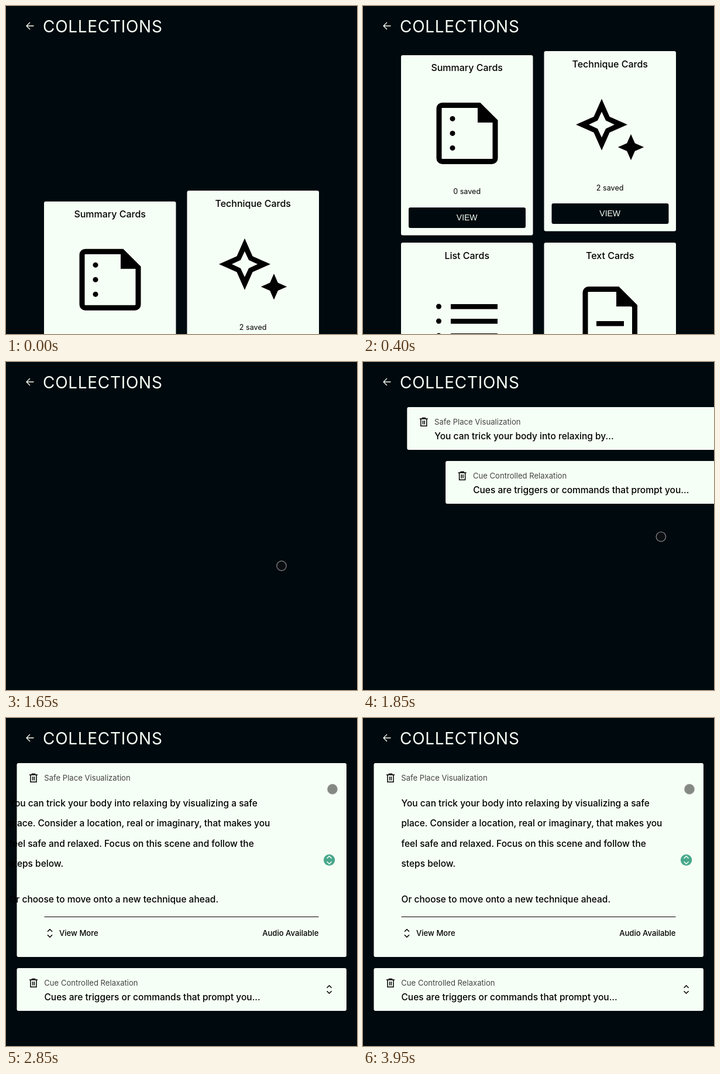
An HTML page that plays this animation: 600x560 px, repeating every 4000 ms.

```html
<!DOCTYPE html>
<html lang="en">
<head>
<meta charset="utf-8">
<title>Collections</title>
<style>
  html, body { margin: 0; width: 100%; height: 100%; overflow: hidden; background: #00090e; }
  svg { display: block; width: 600px; height: 560px; font-family: Inter, sans-serif; }
  .heading { font-size: 28px; letter-spacing: .7px; fill: #f6fff5; }
  .card { fill: #f6fff5; }
  .name { font-size: 16px; font-weight: 500; text-anchor: middle; }
  .saved { font-size: 12.6px; text-anchor: middle; }
  .view { font: 14px "Liberation Sans", Arial, sans-serif; fill: #f6fff5; text-anchor: middle; }
  .label { font-size: 13.1px; fill: #444; }
  .body { font-size: 15.5px; font-weight: 500; }
  .action { font-size: 13.1px; font-weight: 500; }
  .line { fill: none; stroke: #000; stroke-width: 1.6; }
  .heavy { fill: none; stroke: #000; stroke-width: 9; }
</style>
</head>
<body>
<svg id="stage" viewBox="0 0 600 560">
  <path class="line" style="stroke:#f6fff5;stroke-width:1.3" d="M47.5 34H35M41 28L35 34L41 40"/>
  <text class="heading" x="63" y="44.5">COLLECTIONS</text>
  <g id="grid"></g>
  <g id="list"></g>
  <circle id="cursor" r="8.2" fill="#141414" fill-opacity=".5" stroke="#8c8c8c" stroke-opacity=".85" stroke-width="1.4"/>
</svg>
<script>
const LOOP = 4000, CARDS_LEAVE = 1350, LIST_ENTER = 1700, HOVER = 2550, EXPAND = 2850;
const $ = id => document.getElementById(id);
const clamp = v => Math.min(1, Math.max(0, v));
const easeOut = v => 1 - (1 - clamp(v)) ** 3;
const decay = (amount, elapsed, tau) => amount * Math.exp(-Math.max(0, elapsed) / tau);
const move = (el, x, y) => el.setAttribute('transform', `translate(${x} ${y})`);
const show = (el, visible) => el.setAttribute('visibility', visible ? 'inherit' : 'hidden');

function star(cx, cy, outer, inner, fill = '#000') {
  const points = Array.from({ length: 8 }, (_, i) => {
    const r = i % 2 ? inner * Math.SQRT2 : outer, a = i * Math.PI / 4;
    return `${cx + r * Math.cos(a)},${cy + r * Math.sin(a)}`;
  });
  return `<polygon points="${points.join(' ')}" fill="${fill}"/>`;
}
const dots = (x, y) => [0, 25, 50].map(d => `<circle cx="${x}" cy="${y + d}" r="4.5"/>`).join('');
const bar = (x, y, w) => `<rect x="${x}" y="${y}" width="${w}" height="8.5"/>`;

// Page with a folded top right corner.
function page(left, top, right, bottom, fold) {
  const r = 5.5, x = right - fold;
  return `<path class="heavy" d="M${left + r} ${top}H${x}L${right} ${top + fold}V${bottom - r}
    a${r} ${r} 0 0 1 ${-r} ${r}H${left + r}a${r} ${r} 0 0 1 ${-r} ${-r}V${top + r}a${r} ${r} 0 0 1 ${r} ${-r}Z"/>
    <path d="M${x - 2.5} ${top}v29.5H${right + 2}v-4L${x + 2} ${top - 2}Z"/>`;
}

const cards = [
  { name: 'Summary Cards', count: 0, x: 65, y: 77, rise: 258, time: 572,
    icon: page(65, 85.5, 161, 181.5, 27.5) + dots(88, 108.5) },
  { name: 'Technique Cards', count: 2, x: 309.5, y: 77, rise: 240, time: 400,
    icon: star(98.5, 125.5, 44, 13.5) + star(98.5, 125.5, 22, 7, '#f6fff5') + star(148.5, 164, 22.2, 6.8) },
  { name: 'List Cards', count: 0, x: 65, y: 404, rise: 220, time: 400,
    icon: dots(64.5, 109) + [105, 130, 155].map(y => bar(85, y, 80)).join('') },
  { name: 'Text Cards', count: 0, x: 309.5, y: 404, rise: 200, time: 400,
    icon: page(70.5, 79.5, 155, 195, 29) + bar(89.5, 134, 47) }
];
$('grid').innerHTML = cards.map(c => `<g>
  <rect class="card" width="225.5" height="307.5" rx="3"/>
  <text class="name" x="112.7" y="27.5">${c.name}</text>${c.icon}
  <text class="saved" x="112.7" y="237.5">${c.count} saved</text>
  <rect x="13" y="260" width="200" height="35" rx="3" fill="#00090e"/>
  <text class="view" x="112.7" y="282">VIEW</text></g>`).join('');

const chevrons = 'M-4-2.7L0-6.7L4-2.7M-4 2.7L0 6.7L4 2.7';
const row = (label, text) => `<g>
  <rect class="card" x="18.5" width="563.5" height="73" rx="3"/>
  <path class="line" style="stroke-width:1.5" d="M40 20H54M44.5 19.5V18.5H49.5V19.5M42 20V32.2H52V20M45.6 23V29.5M48.4 23V29.5"/>
  <text class="label" x="65.3" y="30">${label}</text>
  <text class="body summary" x="65.5" y="54.5">${text}</text>
  <g class="toggle"><circle r="9.7" fill="none"/><path class="line" d="${chevrons}"/></g></g>`;

$('list').innerHTML =
  row('Safe Place Visualization', 'You can trick your body into relaxing by...') +
  row('Cue Controlled Relaxation', 'Cues are triggers or commands that prompt you...') +
  `<g id="details"><g id="story">${[
    ['You can trick your body into relaxing by visualizing a safe', 150.5],
    ['place. Consider a location, real or imaginary, that makes you', 185],
    ['feel safe and relaxed. Focus on this scene and follow the', 219.5],
    ['steps below.', 254],
    ['Or choose to move onto a new technique ahead.', 314.5]
  ].map(([text, y]) => `<text class="body" x="65.5" y="${y}">${text}</text>`).join('')}</g>
  <path class="line" style="stroke-width:1" d="M65.5 339.5H534.5"/>
  <path class="line" transform="translate(75 367.5)" d="${chevrons}"/>
  <text class="action" x="91" y="372">View More</text>
  <text class="action" x="534.5" y="372" text-anchor="end">Audio Available</text></g>`;

const cardEls = [...$('grid').children];
const [firstRow, secondRow] = $('list').children;
const toggles = [...document.querySelectorAll('.toggle')];
const [toggleDisc, toggleIcon] = toggles[0].children;
move(toggles[1], 552.6, 36.5);

// Pointer stops: time, x, y.
const path = [[750, 528, 570], [1200, 471, 346], [1300, 471, 346], [1500, 471, 348], [1750, 471, 348],
              [2000, 566, 225], [2250, 586, 148], [2350, 585.5, 144.5], [2600, 558, 121.5], [LOOP, 558, 121.5]];
function pointerAt(t) {
  const i = path.findIndex(stop => t < stop[0]);
  if (i < 1) return path[0].slice(1);
  const [t0, x0, y0] = path[i - 1], [t1, x1, y1] = path[i];
  const k = (t - t0) / (t1 - t0);
  return [x0 + (x1 - x0) * k, y0 + (y1 - y0) * k];
}

function draw(t) {
  const fade = 1 - clamp((t - CARDS_LEAVE) / 200);
  $('grid').setAttribute('opacity', fade);
  show($('grid'), fade > 0);
  cards.forEach((c, i) => move(cardEls[i], c.x, c.y + c.rise * (1 - easeOut(t / c.time))));

  const open = t >= EXPAND, hover = t >= HOVER;
  show($('list'), t >= LIST_ENTER);
  move(firstRow, decay(580, t - LIST_ENTER, 65), 77);
  move(secondRow, decay(580, t - LIST_ENTER - 50, 65), open ? 427 : 169);
  firstRow.querySelector('.card').setAttribute('height', open ? 331 : 73);
  show(firstRow.querySelector('.summary'), !open);
  move(toggles[0], 552.6, open ? 165.5 : 36.5);
  toggleDisc.setAttribute('fill', hover ? '#48a88c' : 'none');
  toggleIcon.style.stroke = hover ? '#f6fff5' : '#000';
  show($('details'), open);
  move($('story'), decay(-61, t - EXPAND, 63), 0);

  move($('cursor'), ...pointerAt(t));
}

const start = performance.now();
function frame(now) {
  draw(Math.max(0, now - start) % LOOP);
  requestAnimationFrame(frame);
}
draw(0);
requestAnimationFrame(frame);
</script>
</body>
</html>
```
